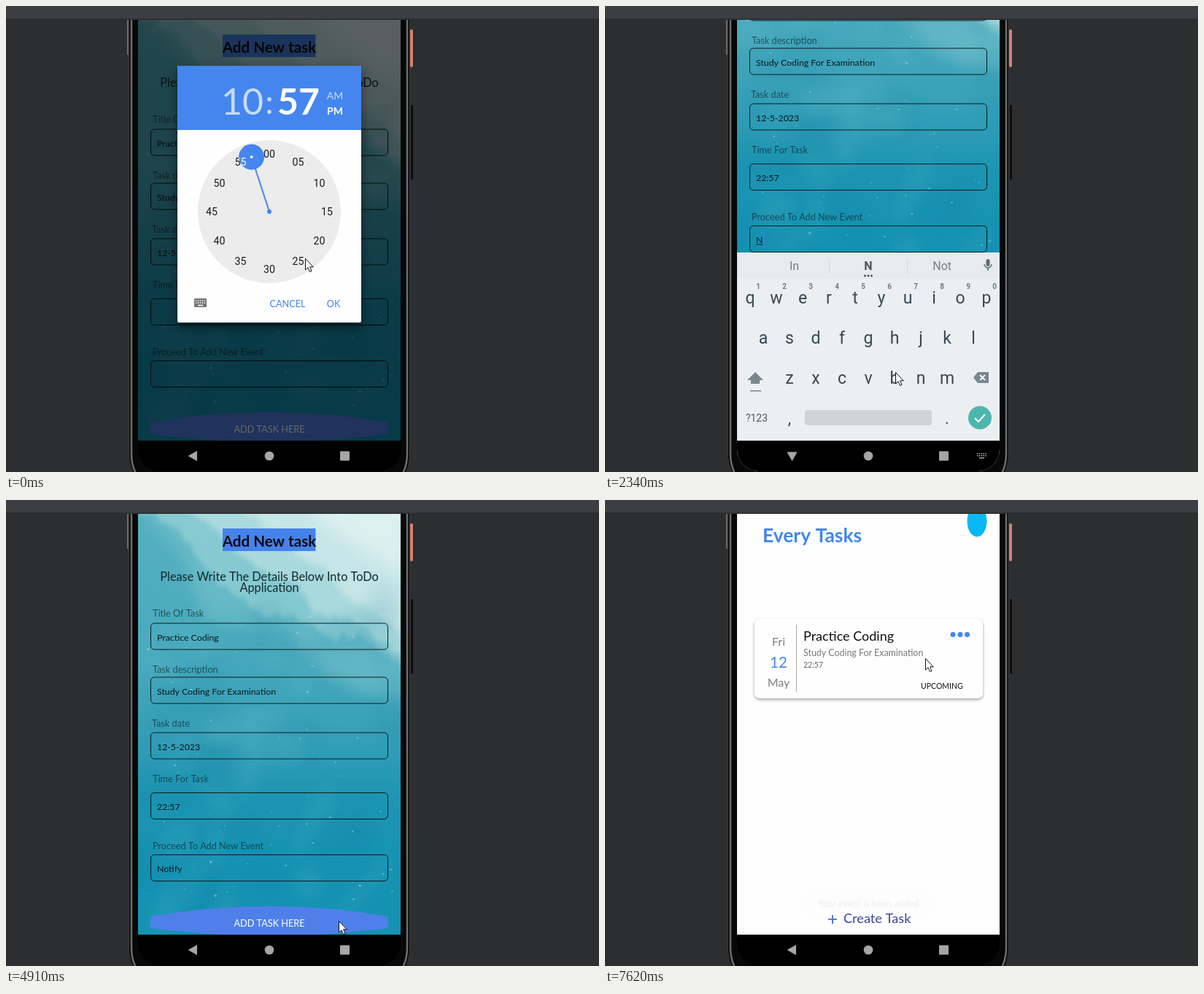
Animation of 813 by 639 pixels, one loop 8000 ms. Source, as an HTML page with a canvas:

```html
<!DOCTYPE html>
<html>
<head>
<meta charset="utf-8">
<style>
html, body { margin: 0; width: 100%; height: 100%; overflow: hidden; background: #2d2e30; }
canvas { display: block; }
</style>
</head>
<body>
<canvas id="stage" width="813" height="639"></canvas>
<script>
const ctx = document.getElementById('stage').getContext('2d');
const BLUE = '#4486ee', LATO = 'Lato, sans-serif', ROBOTO = 'Roboto, sans-serif';
const LOOP = 8000;

const BURSTS = [[140, 1170, 7], [1320, 1750, 4], [2040, 2340, 3], [2650, 3240, 5], [3800, 3800, 1],
  [4340, 4910, 5], [5340, 6360, 8], [6510, 6930, 4], [7370, 7620, 3]];
const updates = BURSTS.flatMap(([a, b, n]) =>
  Array.from({ length: n }, (_, i) => n > 1 ? a + (b - a) * i / (n - 1) : a));
const lastUpdate = t => updates.reduce((last, u) => u <= t + 1 ? u : last, 0);

// Linear interpolation through [time, value] pairs.
function track(t, keys) {
  let i = keys.findIndex(k => k[0] > t);
  if (i < 0) return keys[keys.length - 1][1];
  if (i === 0) return keys[0][1];
  const [a, va] = keys[i - 1], [b, vb] = keys[i];
  return va + (vb - va) * (t - a) / (b - a);
}

function text(s, x, y, size, color, { align = 'left', weight = 400, font = LATO } = {}) {
  ctx.font = `${weight} ${size}px ${font}`;
  ctx.fillStyle = color;
  ctx.textAlign = align;
  ctx.fillText(s, x, y);
  return ctx.measureText(s).width;
}
const label = (s, x, y, size, color, opts) => text(s, x, y, size, color, { align: 'center', ...opts });
function rect(x, y, w, h, color, r = 0) {
  ctx.fillStyle = color;
  ctx.beginPath();
  ctx.roundRect(x, y, w, h, r);
  ctx.fill();
}
function disc(x, y, r, color, ry = r) {
  ctx.fillStyle = color;
  ctx.beginPath();
  ctx.ellipse(x, y, r, ry, 0, 0, 7);
  ctx.fill();
}
function poly(points, color) {
  ctx.fillStyle = color;
  ctx.beginPath();
  points.forEach(p => ctx.lineTo(...p));
  ctx.closePath();
  ctx.fill();
}
function line(points, color, width) {
  ctx.strokeStyle = color;
  ctx.lineWidth = width;
  ctx.beginPath();
  points.forEach(p => ctx.lineTo(...p));
  ctx.stroke();
}
function group(draw, { x = 0, y = 0, alpha = 1 } = {}) {
  if (alpha <= 0) return;
  ctx.save();
  ctx.translate(x, y);
  ctx.globalAlpha *= alpha;
  draw();
  ctx.restore();
}

// Watercolour backdrop, 360 x 720, painted once.
function paintSky() {
  const sky = document.createElement('canvas');
  sky.width = 360;
  sky.height = 720;
  const c = sky.getContext('2d');
  let seed = 7;
  const rnd = () => (seed = seed * 16807 % 2147483647) / 2147483647;
  const base = c.createLinearGradient(0, 110, 0, 640);
  [[0, '#58b1c1'], [.3, '#4dacbe'], [.6, '#3ba2b9'], [.8, '#1c95b3'], [1, '#1592b2']]
    .forEach(s => base.addColorStop(...s));
  c.fillStyle = base;
  c.fillRect(0, 0, 360, 720);

  const cloud = (edge, color, blur) => {
    c.filter = `blur(${blur}px)`;
    c.fillStyle = color;
    c.beginPath();
    c.moveTo(380, -20);
    c.lineTo(edge[0][0], -20);
    for (let i = 1; i < edge.length; i++) {
      const [ax, ay] = edge[i - 1], [bx, by] = edge[i];
      for (let k = 0; k < 1; k += .1)
        c.lineTo(ax + (bx - ax) * k + rnd() * 8 - 4, ay + (by - ay) * k + rnd() * 12 - 6);
    }
    c.lineTo(380, edge[edge.length - 1][1]);
    c.fill();
  };
  cloud([[-10, 120], [60, 200], [90, 290], [150, 300], [210, 310], [260, 370], [370, 400]], 'rgba(160,215,218,.3)', 10);
  cloud([[-10, 130], [50, 160], [110, 240], [170, 280], [230, 290], [270, 318], [300, 305], [370, 355]], 'rgba(180,224,225,.4)', 3);
  cloud([[40, 120], [110, 170], [150, 210], [215, 240], [240, 280], [300, 290], [370, 345]], 'rgba(205,234,233,.5)', 3);
  cloud([[130, 120], [190, 180], [250, 215], [290, 260], [370, 310]], 'rgba(225,242,240,.5)', 5);
  cloud([[210, 110], [260, 160], [300, 190], [370, 230]], 'rgba(238,248,246,.55)', 12);
  c.filter = 'blur(9px)';
  for (let i = 0; i < 40; i++) {
    c.fillStyle = i % 2 ? 'rgba(130,205,215,.10)' : 'rgba(5,115,150,.08)';
    c.beginPath();
    c.ellipse(rnd() * 360, 290 + rnd() * 400, 15 + rnd() * 45, 8 + rnd() * 22, rnd() * 3, 0, 7);
    c.fill();
  }
  c.filter = 'none';
  for (let i = 0; i < 170; i++) {
    c.fillStyle = `rgba(205,240,242,${.1 + rnd() * .4})`;
    c.beginPath();
    c.arc(rnd() * 360, 270 + rnd() * 440, .4 + rnd() ** 4 * 1.6, 0, 7);
    c.fill();
  }
  return sky;
}
const sky = paintSky();

function drawDesk() {
  rect(0, 0, 813, 639, '#2d2e30');
  rect(0, 0, 813, 18, '#3c3e41');
  rect(0, 17.5, 813, 1, '#27282a');
  rect(554, 32, 4, 52, '#d2816c', 2);
  rect(555, 136, 3, 102, '#0c0c0d', 1);
  ctx.save();
  ctx.beginPath();
  ctx.rect(0, 19, 813, 620);
  ctx.clip();
  rect(168, -60, 386, 740, '#080808', 66);
  ctx.strokeStyle = '#6c6d6e';
  ctx.lineWidth = 2.5;
  ctx.beginPath();
  ctx.roundRect(172, -60, 378, 736, 62);
  ctx.stroke();
  ctx.strokeStyle = '#3c3c3d';
  ctx.lineWidth = 1;
  ctx.beginPath();
  ctx.roundRect(168.5, -60, 385, 740, 66);
  ctx.stroke();
  rect(166, 19, 1.5, 48, '#77787a');
  ctx.restore();
}

function drawTaskList() {
  rect(181, 19, 360, 577, '#fefefe');
  text('Every Tasks', 216, 58, 26.4, BLUE, { weight: 700 });
  disc(510, 29, 13.5, '#08b8f4', 21.5);
  ctx.save();
  ctx.shadowColor = 'rgba(0,0,0,.35)';
  ctx.shadowBlur = 4;
  ctx.shadowOffsetY = 2;
  rect(205, 163, 313, 109, '#fefefe', 7);
  ctx.restore();
  label('Fri', 238, 200, 16, '#808080');
  label('12', 238, 230, 20.5, BLUE);
  label('May', 238, 256, 16, '#808080');
  rect(262, 171, 1, 92, '#a8a8a8');
  text('Practice Coding', 272, 193, 18, '#111');
  text('Study Coding For Examination', 272, 214, 12.4, '#777');
  text('22:57', 272, 230, 10.5, '#666');
  text('UPCOMING', 433, 259, 10.5, '#111');
  [477, 487, 496.5].forEach(x => disc(x, 184.5, 3.5, BLUE));
}
function drawCreate() {
  rect(306, 574, 12, 1.8, '#3f66c4');
  rect(311, 569, 1.8, 12, '#3f66c4');
  text('Create Task', 327, 580, 18.2, '#303f90');
}

const FIELDS = [
  ['Title Of Task', 201, 160, 169, 'Practice Coding'],
  ['Task description', 201, 237, 243, 'Study Coding For Examination'],
  ['Task date', 200, 311, 319, '12-5-2023'],
  ['Time For Task', 201, 387, 401.5, '22:57'],
  ['Proceed To Add New Event', 201, 478.5, 486.5, '']
];
function drawForm(t, typed) {
  ctx.drawImage(sky, 181, -124);
  ctx.strokeStyle = '#777';
  ctx.lineWidth = 4;
  ctx.beginPath();
  ctx.ellipse(371, -17, 19, 27, 0, 0, 7);
  ctx.stroke();
  line([[360, -17], [368, -7], [383, -28]], '#777', 5);
  rect(297, 39, 127.5, 31, '#4583ea');
  label('Add New task', 361, 64, 20.6, '#0b0b10', { weight: 700 });
  label('Please Write The Details Below Into ToDo', 361, 110.5, 16.3, '#14282d');
  label('Application', 361, 125.5, 16.3, '#14282d');
  FIELDS.forEach(([name, x, baseline, top, value], i) => {
    text(name, x, baseline, 12.7, 'rgba(10,35,42,.65)');
    ctx.strokeStyle = '#0d1a1e';
    ctx.lineWidth = 1;
    ctx.beginPath();
    ctx.roundRect(198.5, top, 325, 36, 5);
    ctx.stroke();
    const shown = i === 4 ? typed : i === 3 && t < 600 ? '' : value;
    const width = text(shown, 207, top + 23.5, 12.3, '#0a171b');
    if (i < 4) return;
    if (typed && t < 4300) rect(207, top + 25, width, 1, '#0a171b');
    if (t > 1500 && t < 3800) rect(207.5 + width, top + 9, 2, 19, '#3e7fe0');
  });
  ctx.fillStyle = '#4f80ea';
  ctx.beginPath();
  ctx.moveTo(198, 571);
  ctx.quadraticCurveTo(361, 543, 523.5, 571);
  ctx.lineTo(523.5, 587);
  ctx.quadraticCurveTo(361, 608, 198, 587);
  ctx.fill();
  label('ADD TASK HERE', 361, 584.5, 12.7, '#fff');
}

function drawPicker() {
  rect(181, 19, 360, 577, 'rgba(0,0,0,.6)');
  ctx.save();
  ctx.shadowColor = 'rgba(0,0,0,.5)';
  ctx.shadowBlur = 14;
  ctx.shadowOffsetY = 6;
  rect(235, 82, 252, 352, '#fefefe', 2);
  ctx.restore();
  rect(235, 82, 252, 88, BLUE, [2, 2, 0, 0]);
  const faded = 'rgba(255,255,255,.7)';
  label('10', 324, 149, 50, faded);
  label(':', 361, 148, 46, faded);
  label('57', 401, 149, 50, '#fff', { weight: 700 });
  label('AM', 451, 128, 14, faded);
  label('PM', 451, 149, 14, '#fff', { weight: 700 });
  disc(361, 282, 98, '#ececec');
  const numbers = color => {
    for (let i = 0; i < 12; i++) {
      const a = i * Math.PI / 6;
      label(String(i * 5).padStart(2, '0'), 361 + 79 * Math.sin(a), 287 - 79 * Math.cos(a), 14.2, color, { font: ROBOTO });
    }
  };
  numbers('#1c1c1c');
  line([[361, 282], [336.6, 207]], BLUE, 2);
  disc(361, 282, 3, BLUE);
  disc(336.6, 207, 17.5, BLUE);
  ctx.save();
  ctx.clip();
  numbers('#fff');
  ctx.restore();
  disc(336.6, 207, 2, '#fff');
  drawKeyIcon(258, 401, '#757575');
  label('CANCEL', 386, 413, 12.7, BLUE);
  label('OK', 449, 413, 12.7, BLUE);
}
function drawKeyIcon(x, y, color) {
  rect(x, y, 17, 12, color, 1);
  for (let r = 0; r < 2; r++)
    for (let i = 0; i < 5; i++) rect(x + 2 + i * 2.9, y + 2.3 + r * 3, 1.4, 1.4, '#fff');
  rect(x + 5, y + 8.8, 7, 1.4, '#fff');
}

const SUGGESTIONS = { N: ['In', 'N', 'Not'], No: ['Not', 'No', 'Now'], Not: ['Note', 'Not', 'Nothing'],
  Noti: ['Notice', 'Noti', 'Noting'], Notif: ['Notify', 'Notif', 'Notified'], Notify: ['Notifying', 'Notify', 'Notice'] };
function drawKeyboard(t, typed) {
  const ink = '#37474f', font = ROBOTO;
  rect(181, 338, 360, 301, '#eceff1');
  rect(181, 338, 360, 35.5, '#e7ebee');
  const words = t >= 2300 && SUGGESTIONS[typed];
  if (words) {
    words.forEach((word, i) => label(word, 259.5 + i * 101.3, 362, 16, i === 1 ? '#4a565c' : '#757f84',
      { font, weight: i === 1 ? 700 : 400 }));
    [307, 414].forEach(x => rect(x, 346, 1, 21, '#d3d8db'));
    [356.5, 361, 365.5].forEach(x => disc(x, 370, 1.4, ink));
  }
  rect(522.5, 347, 5, 10, '#5d6b72', 2.5);
  ctx.strokeStyle = '#5d6b72';
  ctx.lineWidth = 1.5;
  ctx.beginPath();
  ctx.arc(525, 354, 5, 0, Math.PI);
  ctx.stroke();
  rect(524.2, 359, 1.6, 4, '#5d6b72');
  [['qwertyuiop', 199, 407.5], ['asdfghjkl', 217, 462.5], ['zxcvbnm', 253, 517.5]].forEach(([row, x, y], r) =>
    [...row].forEach((key, i) => {
      label(key, x + i * 36, y, 23, ink, { font });
      if (!r) label(String((i + 1) % 10), x + 11 + i * 36, 388, 10, '#707b80', { font, weight: 700 });
    }));
  const grey = '#78868d';
  poly([[206, 502], [217, 513], [212, 513], [212, 518], [200, 518], [200, 513], [195, 513]], grey);
  rect(199, 527, 15, 1.5, grey);
  poly([[505, 509.5], [511, 502], [526, 502], [526, 517], [511, 517]], grey);
  line([[514, 506], [521, 513]], '#fff', 1.8);
  line([[521, 506], [514, 513]], '#fff', 1.8);
  label('?123', 208, 569.5, 14, '#4d5b62', { font });
  label(',', 253, 573, 22, ink, { font });
  rect(274, 554, 174, 21, '#d0d4d6', 4);
  label('.', 469, 573, 22, ink, { font });
  disc(514, 564.5, 16, '#4db6ac');
  line([[507, 565], [512, 570], [521, 560]], '#fff', 2);
}

function drawNav(t) {
  const color = '#a6a6a6', turn = track(t, [[1320, 0], [1750, -1], [4190, -1], [4340, -.65], [4640, 0]]);
  ctx.save();
  ctx.translate(256.5, 617);
  ctx.rotate(turn * Math.PI / 2);
  poly([[-7, 0], [5.5, -7], [5.5, 7]], color);
  ctx.restore();
  disc(361, 617, 6.3, color);
  rect(458, 610.5, 13, 13, color, 1);
  if (t < 1100 || t > 4300) return;
  for (let r = 0; r < 2; r++)
    for (let i = 0; i < 5; i++) rect(510 + i * 2.8, 613 + r * 2.8, 1.6, 1.6, color);
  rect(513, 619, 7, 1.6, color);
}

function drawToast() {
  rect(268.5, 530, 184.5, 45, '#eeeeee', 22);
  label('Your event is been added', 361, 558, 12.5, '#222');
}

function drawPointer(t) {
  if (t >= 2750 && t < 4300) return;
  const x = track(t, [[140, 410], [480, 446], [660, 446], [1000, 398], [4300, 398], [4340, 433], [4770, 456], [6360, 456], [6930, 439]]);
  const y = track(t, [[140, 346], [480, 402], [660, 402], [1000, 502], [4300, 502], [4340, 568], [4770, 577], [5480, 577], [6200, 299], [6360, 299], [6930, 217]]);
  group(() => {
    const shape = [[.5, .5], [.5, 16], [4, 12.8], [6.5, 18.5], [9, 17.4], [6.6, 11.8], [11.3, 11.8], [.5, .5]];
    poly(shape, '#fff');
    line(shape, '#111', 1);
  }, { x, y });
}

function typedText(t) {
  if (t < 2180) return '';
  return 'Notify'.slice(0, 1 + updates.filter(u => u >= 2650 && u <= 3241 && u <= t + 1).length);
}

function draw(now) {
  const t = lastUpdate(now), typed = typedText(t);
  const lift = track(t, [[1170, 0], [1320, 23], [1463, 112], [1607, 170], [1750, 185], [4190, 185],
    [4340, 64], [4483, 20], [4625, 0], [4910, 0], [5340, -124], [5490, -180]]);
  const drop = track(t, [[1170, 258], [1320, 166], [1463, 70], [1607, 16], [1750, 0], [4190, 0], [4340, 49], [4483, 140], [4625, 258]]);
  const keyAlpha = track(t, [[1170, 0], [1320, .36], [1463, .72], [1607, .95], [1750, 1], [4190, 1], [4340, .48], [4483, .18], [4625, 0]]);
  const formAlpha = track(t, [[4910, 1], [5340, .1], [5480, 0]]);
  const scrim = track(t, [[4910, .6], [5340, .18], [5480, .06], [5630, 0]]);
  const toast = track(t, [[5600, 0], [5920, .94], [7240, .94], [7370, .6], [7495, .3], [7620, .07]]);

  drawDesk();
  ctx.save();
  ctx.beginPath();
  ctx.roundRect(181, -60, 360, 698, 30);
  ctx.clip();
  ctx.beginPath();
  ctx.rect(181, 19, 360, 620);
  ctx.clip();
  rect(181, 596, 360, 43, '#000');
  drawTaskList();
  if (t > 4300) drawCreate();
  rect(181, 19, 360, 577, `rgba(0,0,0,${scrim})`);
  group(() => {
    ctx.beginPath();
    ctx.rect(181, -124, 360, 720);
    ctx.clip();
    drawForm(t, typed);
  }, { y: -lift, alpha: formAlpha });
  if (t < 600) drawPicker();
  if (keyAlpha === 1) {
    drawKeyboard(t, typed);
    rect(181, 596, 360, 43, '#000');
  } else group(() => drawKeyboard(t, typed), { y: drop, alpha: keyAlpha });
  drawNav(t);
  group(drawToast, { alpha: toast });
  ctx.restore();
  drawPointer(t);
}

function tick() {
  draw(performance.now() % LOOP);
  requestAnimationFrame(tick);
}
tick();
</script>
</body>
</html>
```
